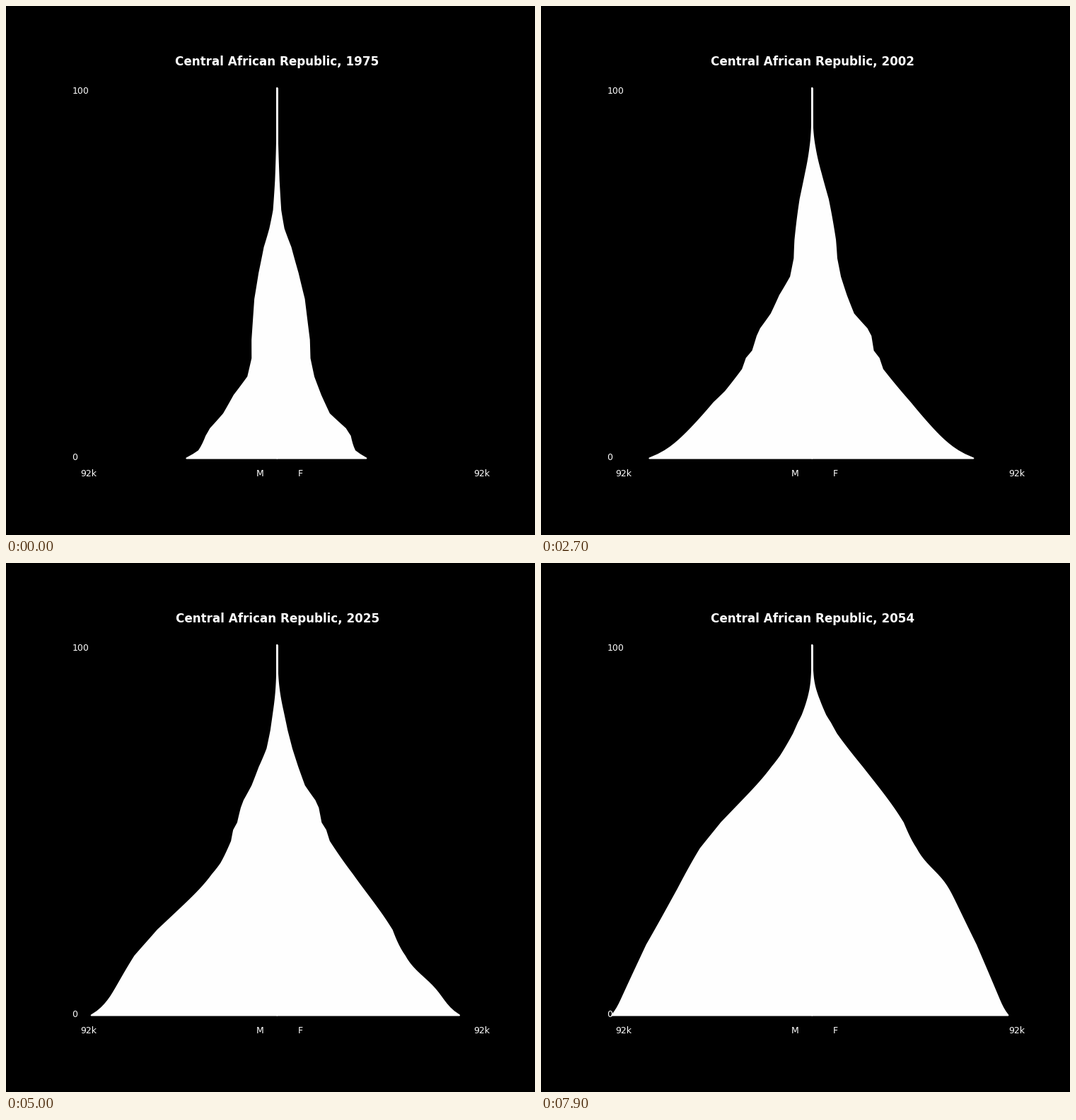
These frames come from a looping animation (748 px wide and 748 px high, 8000 ms). A matplotlib script:

```python
import numpy as np
import matplotlib.pyplot as plt
from matplotlib.animation import FuncAnimation
from matplotlib.patches import Polygon

SIZE, DPI = 748, 100
FRAMES, INTERVAL = 80, 100
START = 1975
CENTRE, BASE, STEP = 383.35, 639.54, 5.236  # px: axis, age 0, one year of age
AGES = np.arange(101)
HEIGHT = BASE - STEP * AGES

# Turning points of the yearly births, as half widths in px
BIRTH_YEARS = [1885, 1900, 1908, 1913, 1918, 1925, 1932, 1943, 1948, 1953, 1958, 1963, 1967,
               1969, 1973, 1975, 1978, 1984, 1987, 1996, 2002, 2009, 2020, 2035, 2054]
MALE = [4, 7, 11, 20, 32, 41, 47, 48, 46, 52, 74, 89, 108,
        113, 118, 128, 132, 156, 172, 207, 230, 247, 257, 274, 283]
FEMALE = [5, 7, 10, 17, 32, 45, 55, 60, 59, 64, 74, 86, 110,
          116, 117, 126, 130, 156, 169, 204, 228, 243, 253, 267, 277]


def bell(x, mid, width):
    return np.exp(-((x - mid) / width) ** 2)


def loss(age, year, adult, flight_age):
    """Yearly loss rate: childhood, adult life and old age, a crisis, flight."""
    child = np.interp(year, [2005, 2050], [0.1, 0.025]) / 2.5 * np.exp(-age / 2.5)
    crisis = 0.013 * bell(year, 2007, 12)
    grown = 0.0045 + (0.004 + crisis) * (1 - np.exp(-age / 20))
    old = 1.53e-5 * np.exp(0.112 * age)
    flight = 0.017 * bell(year, 2015, 4) * bell(age, flight_age, 9)
    return child + adult * (grown + old) + flight


def widths(year, births, adult, flight_age):
    """Half width per age: births of each cohort times its survival."""
    age, lived = AGES[:, None], AGES[None, :] + 0.5
    rate = loss(lived, year - age + lived, adult, flight_age)
    total = np.where(lived < age, rate, 0).sum(axis=1)
    return np.interp(year - AGES, BIRTH_YEARS, births) * np.exp(-total)


fig = plt.figure(figsize=(SIZE / DPI, SIZE / DPI), dpi=DPI, facecolor="black")
ax = fig.add_axes([0, 0, 1, 1])
ax.set(xlim=(0, SIZE), ylim=(SIZE, 0))
ax.axis("off")


def label(x, y, text, size=9, **kw):
    return ax.text(x, y, text, color="white", fontsize=size, family="DejaVu Sans",
                   va="baseline", **kw)


title = label(CENTRE + 0.25, 84, "", 12.04, weight="bold", ha="center")
for x, y, text in [(93.5, 124, "100"), (93.5, 642, "0"), (105.3, 665, "92k"),
                   (353.8, 665, "M"), (412.6, 665, "F"), (661.4, 665, "92k")]:
    label(x, y, text)


def half():
    return ax.add_patch(Polygon([(0, 0)], closed=True, fc="#fefefe", ec="#fefefe",
                                lw=1.5, joinstyle="round"))


# Patch, direction, births, adult loss factor, age most prone to flight
SIDES = [(half(), -1, MALE, 1.0, 30), (half(), 1, FEMALE, 0.85, 6)]


def update(frame):
    year = START + frame
    title.set_text(f"Central African Republic, {year}")
    for patch, sign, *people in SIDES:
        edge = np.column_stack([CENTRE + sign * widths(year, *people), HEIGHT])
        patch.set_xy(np.vstack([edge, (CENTRE, HEIGHT[-1]), (CENTRE, BASE)]))
    return [title] + [side[0] for side in SIDES]


anim = FuncAnimation(fig, update, frames=FRAMES, interval=INTERVAL, repeat=True,
                     repeat_delay=0)
plt.show()
```
